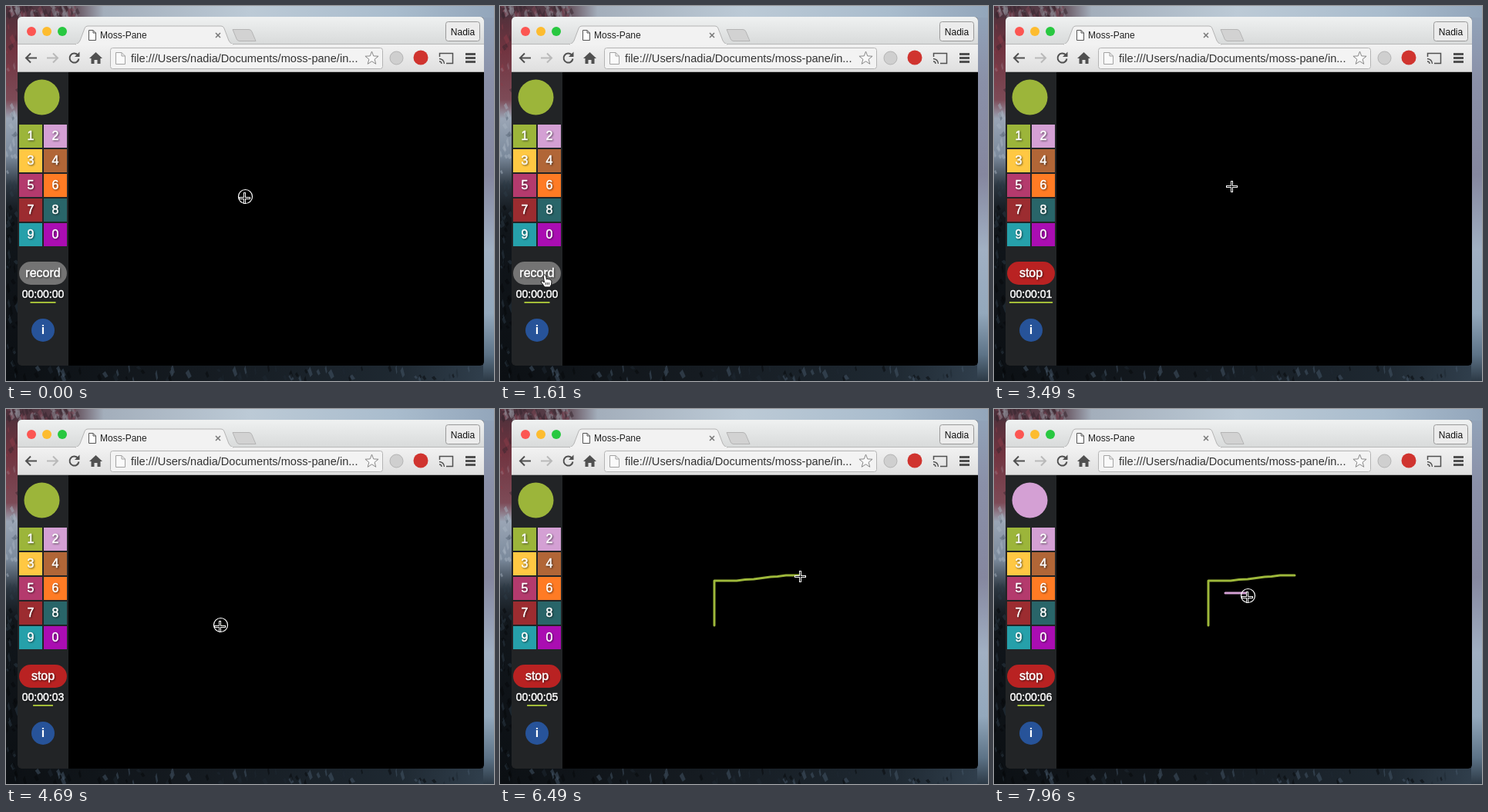
Write an HTML page that moves like this. It is 633x487 px and loops after 7.99 s.

```html
<!DOCTYPE html>
<html lang="en">
<head>
<meta charset="utf-8">
<title>Drawing app</title>
<style>
  html, body { margin: 0; width: 100%; height: 100%; overflow: hidden; background: #12171c; }
  svg { display: block; width: 633px; height: 487px; }
  text { font-family: "Liberation Sans", Arial, sans-serif; white-space: pre; }
  .label { fill: #fff; stroke: #fff; stroke-width: .5; text-anchor: middle; filter: drop-shadow(1px 1px 1px rgba(0,0,0,.6)); }
  .icon { fill: none; stroke: #505050; stroke-width: 2; }
  .ink { fill: none; stroke-width: 3; stroke-linecap: round; stroke-linejoin: round; }
</style>
</head>
<body>
<svg viewBox="0 0 633 487">
  <defs>
    <linearGradient id="strip" x2="0" y2="1"><stop stop-color="#eff1f1"/><stop offset="1" stop-color="#d8dada"/></linearGradient>
    <linearGradient id="bar" x2="0" y2="1"><stop stop-color="#f2f2f2"/><stop offset="1" stop-color="#dfdfdf"/></linearGradient>
    <linearGradient id="sky"><stop stop-color="#4a2f3a"/><stop offset=".13" stop-color="#59404b"/><stop offset=".2" stop-color="#a3aebb"/><stop offset=".5" stop-color="#bccad6"/><stop offset=".8" stop-color="#a9bccd"/><stop offset="1" stop-color="#93a6bb"/></linearGradient>
    <linearGradient id="leftSlope" x2="0" y2="1"><stop stop-color="#4a303a"/><stop offset=".12" stop-color="#713440"/><stop offset=".25" stop-color="#7d4b57"/><stop offset=".3" stop-color="#9aa5b5"/><stop offset=".4" stop-color="#7b8a9c"/><stop offset=".48" stop-color="#2b353f"/><stop offset=".56" stop-color="#11161b"/><stop offset="1" stop-color="#0b0f13"/></linearGradient>
    <linearGradient id="rightSlope" x2="0" y2="1"><stop stop-color="#93a6bb"/><stop offset=".2" stop-color="#8a90a8"/><stop offset=".45" stop-color="#85879f"/><stop offset=".65" stop-color="#a1b0c3"/><stop offset=".82" stop-color="#93a8bc"/><stop offset=".93" stop-color="#5d7387"/><stop offset="1" stop-color="#2c3945"/></linearGradient>
    <linearGradient id="ground"><stop stop-color="#0c1014"/><stop offset=".4" stop-color="#151b21"/><stop offset=".8" stop-color="#1e2831"/><stop offset="1" stop-color="#32414f"/></linearGradient>
    <clipPath id="frame"><rect x="15" y="14" width="605" height="453" rx="5"/></clipPath>
  </defs>

  <rect y="466" width="633" height="21" fill="url(#ground)"/>
  <rect width="16" height="487" fill="url(#leftSlope)"/>
  <rect x="619" width="14" height="487" fill="url(#rightSlope)"/>
  <rect width="633" height="15" fill="url(#sky)"/>
  <g id="rocks"></g>

  <rect x="15" y="14" width="605" height="453" rx="5"/>
  <g clip-path="url(#frame)">
    <rect x="15" y="14" width="605" height="36" fill="url(#strip)"/>
    <rect x="15" y="49" width="605" height="37" fill="url(#bar)"/>
    <path d="M15 49.5H620" stroke="#b8b8b8"/>
    <path d="M15 85.5H620" stroke="#aaa"/>
    <rect x="15" y="86" width="66" height="381" fill="#222426"/>
  </g>
  <path d="M90 50Q94 49 96 45L102 29Q103 26 106 26H279Q282 26 283 29L289 45Q291 49 295 50" fill="#f2f2f2" stroke="#b4b4b4"/>
  <path d="M91 50H294" stroke="#f2f2f2" stroke-width="2"/>
  <path d="M294 30.500H315Q318 30.500 319 33.500L324 45.500H303Q300 45.500 299 42.500Z" fill="#d2d2d2" stroke="#b4b4b4"/>
  <circle cx="33" cy="33" r="6" fill="#fc5652"/>
  <circle cx="53" cy="33" r="6" fill="#fdbc2f"/>
  <circle cx="73" cy="33" r="6" fill="#28c840"/>
  <path d="M107.500 31.500H113L116.500 35V44.500H107.500ZM113 31.500V35H116.500" fill="#fff" stroke="#555"/>
  <text x="122" y="42" font-size="12" fill="#222">Moss-Pane</text>
  <path d="M272 35L278 41M278 35L272 41" stroke="#777" stroke-width="1.500"/>
  <rect x="570.500" y="20.500" width="44" height="25" rx="3" fill="#ececec" stroke="#999"/>
  <text x="592.500" y="38" font-size="12" fill="#111" text-anchor="middle">Nadia</text>

  <path class="icon" d="M40 67.500H27M32 61.500L26 67.500L32 73.500"/>
  <path class="icon" d="M53 67.500H66M61 61.500L67 67.500L61 73.500" style="stroke:#b9b9b9"/>
  <path class="icon" d="M93 63.500A6 6 0 1 0 94.500 68.500"/>
  <path d="M95.500 59.500V66H89Z" fill="#505050"/>
  <path d="M116.500 60L125 68H122.500V75H118.500V70H114.500V75H110.500V68H108Z" fill="#505050"/>
  <rect x="135.500" y="54.500" width="353" height="27" rx="3" fill="#f3f3f3" stroke="#b4b4b4"/>
  <path d="M142.500 60.500H150L154.500 65V75.500H142.500ZM150 60.500V65H154.500" fill="#fafafa" stroke="#a3a3a3"/>
  <text x="162" y="73" font-size="14.600" fill="#333">file:///Users/nadia/Documents/moss-pane/in...</text>
  <path id="star" fill="#fafafa" stroke="#888"/>
  <circle cx="506.500" cy="67.500" r="8.500" fill="#cfcfcf" stroke="#b3b3b3"/>
  <circle cx="538" cy="67" r="9.500" fill="#d0342f"/>
  <path class="icon" d="M562.500 66V61.500H579.500V74.500H571" style="stroke-width:1.500"/>
  <path class="icon" d="M562 68.500Q568 69 568.500 75M562 72Q565 72 565 75" style="stroke-width:1.300"/>
  <path d="M596 62.500H609M596 67.500H609M596 72.500H609" stroke="#505050" stroke-width="3"/>

  <circle id="swatch" cx="46.500" cy="118.500" r="23"/>
  <g id="palette"></g>
  <rect id="button" x="17" y="332" width="62" height="30" rx="15"/>
  <text id="action" class="label" x="48" y="352" font-size="16"></text>
  <text id="clock" class="label" x="48" y="379" font-size="14"></text>
  <rect id="pulse" y="384" height="2" fill="#a3bd38"/>
  <circle cx="48" cy="421" r="15" fill="#275399"/>
  <text x="48" y="426" font-size="16" font-weight="bold" fill="#fff" text-anchor="middle">i</text>

  <path id="green" class="ink" stroke="#9eb83b" d="M278 281V223H307L318 221.500L329 221L351 218L360 217.500L371 216H390"/>
  <path id="pink" class="ink" stroke="#d4a0d4" d="M300 239H328"/>

  <g id="cross">
    <circle id="ring" cx="1.500" cy="-1.500" r="9" fill="none" stroke="#fff" stroke-width="1.200"/>
    <path d="M-7 .5H8M.5 -7V8" stroke="#fff" stroke-width="3"/>
    <path d="M-6 .5H7M.5 -6V7" stroke="#000"/>
  </g>
  <g id="hand" stroke="#111">
    <path d="M-2 0Q0-2.500 1.500 0L2.500 5Q4 3.500 5 5Q7 4 7.500 6Q9 6 9 8Q9 12 7 15H0L-4.500 9Q-5.500 6.500-3 7L-.5 9Z" fill="#fff"/>
    <path d="M1.500 9V12M3.500 9V12M5.500 9V12" stroke-width=".8"/>
  </g>
</svg>
<script>
  const LOOP = 7990;
  const GREEN = '#9cb53a', PINK = '#d4a0d4';
  const RECORD = 2110, INK1 = [4600, 6170], RECOLOR = 6600, INK2 = 7480;
  const $ = id => document.getElementById(id);
  const clamp = (v, lo, hi) => Math.min(hi, Math.max(lo, v));

  // Pointer stops: time, x, y. Repeated positions are rests.
  const pointer = [
    [0, 309, 249], [610, 309, 249], [1410, 66, 353], [1590, 58, 350], [2200, 58, 350],
    [2900, 176, 307], [3440, 308, 234], [3520, 308, 234], [3710, 320, 243], [3860, 320, 243],
    [4540, 277, 282], [4720, 277, 282], [5150, 277, 223], [5190, 277, 223], [5380, 291, 223],
    [5480, 320, 222], [6150, 389, 217], [6620, 389, 217], [6990, 319, 237], [7350, 299, 240],
    [7520, 299, 240], [7810, 316, 240], [7960, 328, 244], [LOOP, 330, 244]
  ];
  // Recorded seconds against playback time.
  const seconds = [
    [RECORD, 0], [3490, 1.85], [3620, 2], [4540, 2.84], [4600, 3], [4690, 3.39],
    [5480, 4.7], [5700, 5], [6490, 5.39], [7010, 6], [7960, 6.53], [LOOP, 6.55]
  ];

  const segment = (keys, t) => {
    let i = 0;
    while (i < keys.length - 2 && t >= keys[i + 1][0]) i++;
    return i;
  };

  function linear(keys, t) {
    const i = segment(keys, t), [a, u] = keys[i], [b, v] = keys[i + 1];
    return u + (v - u) * clamp((t - a) / (b - a), 0, 1);
  }

  function slope(keys, i, axis) {
    const a = keys[i - 1], k = keys[i], b = keys[i + 1];
    if (!a || !b) return 0;
    const before = (k[axis] - a[axis]) / (k[0] - a[0]);
    const after = (b[axis] - k[axis]) / (b[0] - k[0]);
    return before * after <= 0 ? 0 : 2 * before * after / (before + after);
  }

  function smooth(keys, t, axis) {
    const i = segment(keys, t), a = keys[i], b = keys[i + 1];
    const d = b[0] - a[0], s = clamp((t - a[0]) / d, 0, 1), r = 1 - s;
    return (1 + 2 * s) * r * r * a[axis] + s * r * r * d * slope(keys, i, axis)
      + s * s * (3 - 2 * s) * b[axis] - s * s * r * d * slope(keys, i + 1, axis);
  }

  function add(parent, tag, attrs, text = '') {
    const el = document.createElementNS('http://www.w3.org/2000/svg', tag);
    for (const name in attrs) el.setAttribute(name, attrs[name]);
    el.textContent = text;
    parent.append(el);
  }

  function show(id, visible) {
    $(id).style.display = visible ? '' : 'none';
  }

  function drawLine(id, length, visible) {
    show(id, visible);
    $(id).style.strokeDasharray = `${Math.max(length, .1)} 999`;
  }

  const colors = [GREEN, PINK, '#ffc843', '#b16637', '#b43a6d', '#ff7b24', '#9c2c30', '#296569', '#26a0aa', '#aa0db2'];
  colors.forEach((fill, i) => {
    const x = 17 + i % 2 * 32, y = 154 + Math.floor(i / 2) * 32;
    add($('palette'), 'rect', { x, y, width: 30, height: 30, fill });
    add($('palette'), 'text', { x: x + 15, y: y + 20, class: 'label', 'font-size': 16 }, (i + 1) % 10);
  });

  $('star').setAttribute('d', 'M' + Array.from({ length: 10 }, (_, i) => {
    const r = i % 2 ? 3.8 : 9, a = i * Math.PI / 5;
    return `${474.5 + r * Math.sin(a)} ${68 - r * Math.cos(a)}`;
  }).join('L') + 'Z');

  // Loose flecks of rock on the dark slopes around the window.
  let seed = 11;
  const random = () => (seed = seed * 16807 % 2147483647) / 2147483647;
  const fleck = (x, y, tones) => {
    const w = 1 + random() * 3, h = 3 + random() * 8;
    add($('rocks'), 'path', {
      d: `M${x} ${y}l${w} ${-h / 2}l${w} ${h}l${-w} ${h / 3}Z`,
      fill: tones[Math.floor(random() * tones.length)], opacity: .5
    });
  };
  for (let i = 0; i < 70; i++) {
    const y = random() * 487;
    fleck(random() * 14 - 2, y, y < 125 ? ['#8c3c48', '#38252e', '#93707c'] : y < 220 ? ['#a6b2c0', '#566473'] : ['#05080a', '#2c3945']);
    fleck(random() * 633, 468 + random() * 18, ['#05080a', '#455869', '#1e2831']);
    fleck(random() * 90, random() * 14, ['#33232c', '#7d4653', '#8b8993']);
  }

  function render(now) {
    const t = now % LOOP;
    const x = smooth(pointer, t, 1), y = smooth(pointer, t, 2);
    const recording = t >= RECORD;
    const elapsed = recording ? linear(seconds, t) : .5;
    const width = 66 * (elapsed % 1);

    $('swatch').setAttribute('fill', t < RECOLOR ? GREEN : PINK);
    $('button').setAttribute('fill', recording ? '#b92222' : '#747474');
    $('action').textContent = recording ? 'stop' : 'record';
    $('clock').textContent = '00:00:0' + Math.floor(elapsed);
    $('pulse').setAttribute('x', 48 - width / 2);
    $('pulse').setAttribute('width', width);

    const drawing = t >= INK1[0] && t < INK1[1];
    const drawn = clamp(282 - y, 0, 58) + clamp(x - 281, 0, 113);
    drawLine('green', drawing ? drawn : 200, t >= INK1[0]);
    drawLine('pink', x - 299, t >= INK2);

    const overButton = x < 80;
    const place = `translate(${Math.round(x)} ${Math.round(y)})`;
    $('cross').setAttribute('transform', place);
    $('hand').setAttribute('transform', place);
    show('cross', !overButton);
    show('hand', overButton);
    show('ring', t < 30 || drawing || t >= INK2);
    requestAnimationFrame(() => render(performance.now()));
  }
  render(0);
</script>
</body>
</html>
```
